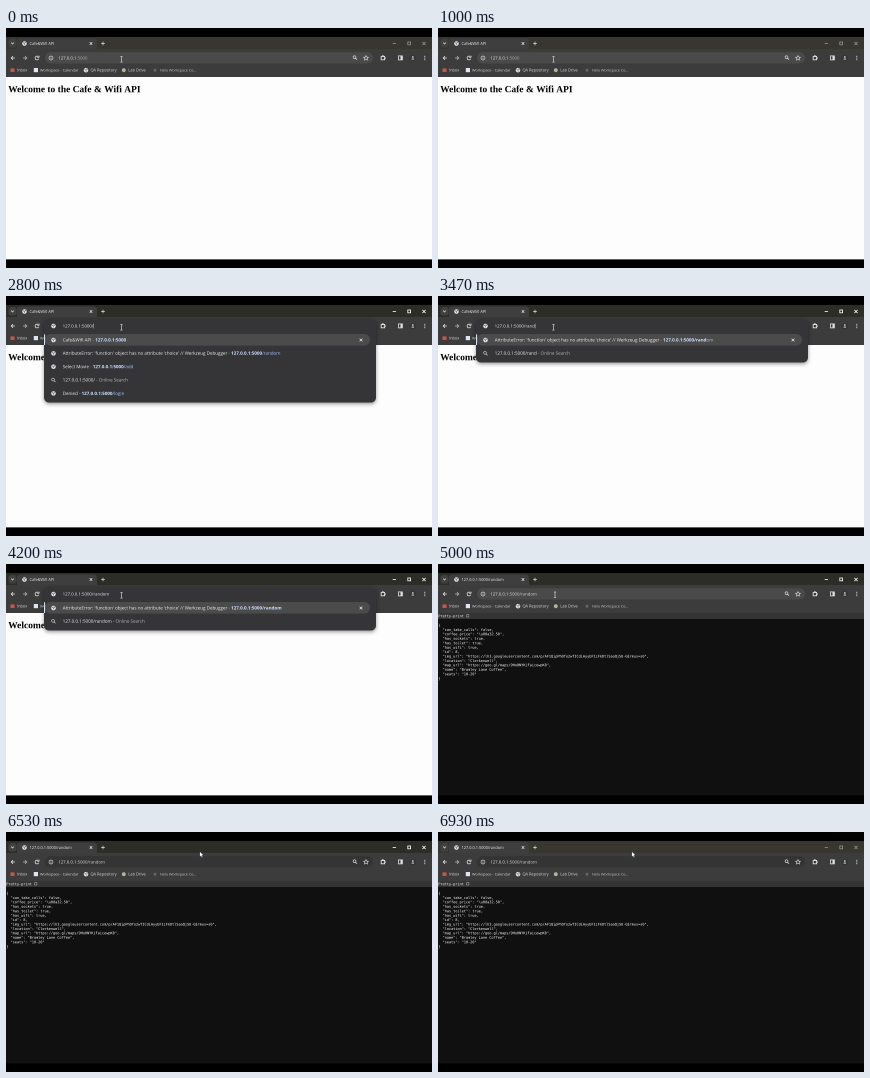
Animation, 426 px wide and 240 px high, one loop 6990 ms. Source, as an HTML page with a canvas:

```html
<!DOCTYPE html>
<html lang="en">
<head>
<meta charset="utf-8">
<title>Cafe API demo</title>
<style>
html, body { margin: 0; width: 100%; height: 100%; overflow: hidden; background: #000; }
canvas { display: block; width: 426px; height: 240px; }
</style>
</head>
<body>
<canvas id="stage"></canvas>
<script>
const W = 426, H = 240, LOOP = 6990;
const UI = '"Open Sans", "Noto Sans", sans-serif';
const MONO = '"DejaVu Sans Mono", "Liberation Mono", monospace';
const SERIF = '"Liberation Serif", "Noto Serif", serif';
const HOST = '127.0.0.1:5000';

// Moments in ms
const ACTIVE = 1250, CLICK = 1750, SLASH = 2300, TYPE = 3000, KEY = 150,
      ENTER = 4750, MOVE = 5800, ARRIVE = 6350, BLUR = 6700;

const canvas = document.getElementById('stage');
const screen2d = canvas.getContext('2d');
const dpr = window.devicePixelRatio || 1;
canvas.width = W * dpr;
canvas.height = H * dpr;

// The scene is drawn large and scaled down, so tiny text stays legible
const SCALE = 4;
const scene = document.createElement('canvas');
scene.width = W * SCALE;
scene.height = H * SCALE;
const c = scene.getContext('2d');
c.scale(SCALE, SCALE);

const JSON_LINES = [
  '{',
  '  "can_take_calls": false,',
  '  "coffee_price": "\\u00a32.50",',
  '  "has_sockets": true,',
  '  "has_toilet": true,',
  '  "has_wifi": true,',
  '  "id": 8,',
  '  "img_url": "https://lh3.googleusercontent.com/p/AF1QipPhOfo2wTICdiAyybF1iFkDtlSaoQjSU-GErmus=s0",',
  '  "location": "Clerkenwell",',
  '  "map_url": "https://goo.gl/maps/9Ho0NYKiFaicewpK8",',
  '  "name": "Bramley Lane Coffee",',
  '  "seats": "10-20"',
  '}'
];

function box(x, y, w, h, fill, r = 0) {
  c.fillStyle = fill;
  c.beginPath();
  c.roundRect(x, y, w, h, r);
  c.fill();
}

function text(s, x, y, size, fill, weight = 400, font = UI) {
  c.font = `${weight} ${size}px ${font}`;
  c.fillStyle = fill;
  c.fillText(s, x, y);
  return x + c.measureText(s).width;
}

// Each argument after the style is one polyline: [x, y, x, y, ...]
function lines(color, width, ...paths) {
  c.strokeStyle = color;
  c.lineWidth = width;
  c.beginPath();
  for (const p of paths) {
    c.moveTo(p[0], p[1]);
    for (let i = 2; i < p.length; i += 2) c.lineTo(p[i], p[i + 1]);
  }
  c.stroke();
}

function ring(x, y, r, color, width = 0.7, from = 0, to = Math.PI * 2) {
  c.strokeStyle = color;
  c.lineWidth = width;
  c.beginPath();
  c.arc(x, y, r, from, to);
  c.stroke();
}

function dot(x, y, r, color) {
  c.fillStyle = color;
  c.beginPath();
  c.arc(x, y, r, 0, Math.PI * 2);
  c.fill();
}

function cross(x, y, r, color, width = 0.7) {
  lines(color, width, [x - r, y - r, x + r, y + r], [x - r, y + r, x + r, y - r]);
}

function globe(x, y) {
  dot(x, y, 2.3, '#e2e4e8');
  lines('#55575a', 0.6, [x - 1.5, y - 0.8, x, y - 0.2, x + 0.3, y + 1.4], [x + 0.3, y - 1.6, x + 1.5, y - 0.3]);
}

function lens(x, y, color) {
  ring(x - 0.5, y - 0.5, 1.4, color);
  lines(color, 0.8, [x + 0.5, y + 0.5, x + 2, y + 2]);
}

function star(x, y, r, color) {
  const p = [];
  for (let i = 0; i <= 10; i++) {
    const a = -Math.PI / 2 + i * Math.PI / 5, d = i % 2 ? r * 0.48 : r;
    p.push(x + d * Math.cos(a), y + d * Math.sin(a));
  }
  lines(color, 0.6, p);
}

function tabStrip(title, active) {
  box(0, 9, W, 14, active ? '#2d2d27' : '#37372f');
  box(11, 10.5, 80, 14, '#3e3e3e', 3);
  box(2.5, 11, 8, 8.5, '#414141', 2.5);
  lines('#d8d8d8', 0.8, [5.2, 14.6, 6.5, 16, 7.8, 14.6]);
  globe(18.5, 15.5);
  text(title, 23.5, 17, 3.9, '#ececec');
  cross(85, 15.5, 1.3, '#e4e4e4');
  lines('#e0e0e0', 0.7, [95.2, 15.5, 98.8, 15.5], [97, 13.7, 97, 17.3]);

  const tone = active ? '#fff' : '#929292';
  lines(tone, 0.8, [386.7, 15.5, 390, 15.5]);
  c.strokeRect(401.8, 14, 2.8, 2.8);
  cross(418, 15.5, 1.6, tone, 0.8);
}

function toolbar(focused, hover) {
  box(0, 21, W, 28, '#3c3c3c');
  const tone = '#e0e0e0';
  lines(tone, 0.8, [9, 30, 5.2, 30], [7, 28.2, 5.2, 30, 7, 31.8]);
  lines('#b0b0b0', 0.8, [17, 30, 20.8, 30], [19, 28.2, 20.8, 30, 19, 31.8]);
  ring(31, 30, 1.9, tone, 0.8, 0.4, 5.4);
  lines(tone, 0.8, [33, 27.6, 33, 29.3, 31.3, 29.3]);
  if (!focused) {
    box(39, 24.2, 328, 11.3, hover ? '#4a4a4a' : '#343434', 5.6);
    ring(45, 30, 2, tone, 0.6);
    lines(tone, 0.6, [45, 29.7, 45, 31.1], [45, 28.7, 45, 29.2]);
    lens(349, 29.7, tone);
    star(360, 30, 2.5, tone);
  }
  c.strokeStyle = tone;
  c.lineWidth = 0.9;
  c.strokeRect(375.2, 28.4, 3.4, 3.4);
  dot(376.9, 28.1, 0.9, tone);
  dot(379, 30.1, 0.8, tone);
  c.lineWidth = 0.8;
  c.strokeRect(392.4, 27.9, 4, 4);
  box(394.5, 28, 1.9, 4, tone);
  dot(406.8, 30, 3, '#343434');
  dot(406.8, 29, 0.9, '#c4c4c4');
  box(405.5, 30.5, 2.6, 1.2, '#c4c4c4', 0.6);
  for (let i = -1; i < 2; i++) dot(418.8, 30 + i * 1.7, 0.55, tone);
}

function bookmarks() {
  const y = 43.6, tone = '#dedede', size = 3.95;
  box(4.5, 40.4, 4, 3.6, '#c9564b');
  text('Inbox', 11, y, size, tone);
  box(27.8, 40, 4.2, 4.2, '#dfe5ee');
  text('Workspace - Calendar', 34, y, 3.8, tone);
  globe(80, 42.2);
  text('QA Repository', 84.5, y, size, tone);
  dot(117.8, 42.2, 2, '#a9b79b');
  text('Lab Drive', 122.3, y, size, tone);
  dot(149, 42.2, 1.6, '#5d6470');
  text('Nelu Workspace Co...', 154, y, 3.7, '#c4c8ce');
}

function homePage() {
  box(0, 49, W, 182.4, '#fdfdfd');
  text('Welcome to the Cafe & Wifi API', 2.2, 64.3, 9.47, '#000', 700, SERIF);
}

function jsonPage() {
  const size = 3.54;
  box(0, 49, W, 182.4, '#101010');
  box(0, 49, W, 6, '#343434');
  text('Pretty-print', 0.3, 53.2, size, '#fff', 400, MONO);
  c.strokeStyle = '#b8b8b8';
  c.lineWidth = 0.5;
  c.strokeRect(28.6, 50.7, 2.3, 2.3);
  JSON_LINES.forEach((s, i) => text(s, 0.3, 62.5 + i * 4.43, size, '#fff', 400, MONO));
}

function suggestions(query) {
  const error = "AttributeError: 'function' object has no attribute 'choice' // Werkzeug Debugger";
  const search = { name: HOST + query, note: 'Online Search' };
  if (query !== '/') return [{ name: error, bold: HOST + query, rest: '/random'.slice(query.length) }, search];
  return [
    { name: 'Cafe&Wifi API', bold: HOST },
    { name: error, bold: HOST, rest: '/random' },
    { name: 'Select Movie', bold: HOST, rest: '/add' },
    search,
    { name: 'Denied', bold: HOST, rest: '/login' }
  ];
}

function omnibox(query, t) {
  const rows = query ? suggestions(query) : [];
  const height = rows.length ? 17 + rows.length * 13.35 : 13;
  c.save();
  c.shadowColor = 'rgba(0,0,0,.4)';
  c.shadowBlur = 4 * SCALE;
  c.shadowOffsetY = 1.5 * SCALE;
  box(38, 22.8, 332, height, '#353538', 5);
  c.restore();
  globe(47.5, 30);

  if (!query) {
    c.font = `400 4.3px ${UI}`;
    box(56.5, 27, c.measureText(HOST).width + 1, 6, '#3f6b9e');
  }
  const end = text(HOST + query, 56.7, 31.6, 4.3, '#f0f0f0');
  if (query && (t - SLASH) % 1000 < 600) box(end + 0.2, 27.6, 0.4, 4.8, '#e4e4e4');

  const size = 4.53;
  rows.forEach((row, i) => {
    const y = 44 + i * 13.35, base = y + 1.5;
    if (!i) {
      box(39, 38, 325, 11.6, '#4b4b4c', 5.5);
      box(38, 38.2, 1.1, 11, '#d4e2f7', 0.5);
      cross(355, 44, 1.4, '#e8e8e8');
    }
    if (row.note) lens(47.5, y, '#c4c4c4'); else globe(47.5, y);
    let x = text(row.name, 56.7, base, size, '#f0f0f0');
    x = text(' - ', x, base, size, '#c4c4c4');
    if (row.note) text(row.note, x, base, size, '#b8b8b8');
    else {
      x = text(row.bold, x, base, size, '#cfe1ff', 700);
      text(row.rest || '', x, base, size, '#a8c7fa');
    }
  });
}

function ibeam(x, y) {
  lines('#d0d0d0', 0.7, [x, y - 2.6, x, y + 2.6], [x - 1.1, y - 2.8, x + 1.1, y - 2.8], [x - 1.1, y + 2.8, x + 1.1, y + 2.8]);
}

function arrow(x, y) {
  c.beginPath();
  [[0, 0], [0, 5.2], [1.2, 4.1], [2.1, 6], [2.9, 5.6], [2, 3.8], [3.7, 3.7]]
    .forEach(([dx, dy]) => c.lineTo(x + dx, y + dy));
  c.closePath();
  c.fillStyle = '#fff';
  c.fill();
  c.strokeStyle = '#111';
  c.lineWidth = 0.2;
  c.stroke();
}

function ease(t, from, to) {
  const k = Math.min(1, Math.max(0, (t - from) / (to - from)));
  return k * k * (3 - 2 * k);
}

function draw(t) {
  const loaded = t >= ENTER;
  const focused = t >= CLICK && !loaded;
  const drift = ease(t, ENTER, ENTER + 500), go = ease(t, MOVE, ARRIVE);
  const mx = 115.5 + 3 * drift + 75.3 * go, my = 31.3 - drift - 9.7 * go;
  const overBar = my > 24.5;

  box(0, 0, W, H, '#000');
  tabStrip(loaded ? HOST + '/random' : 'Cafe&Wifi API', t >= ACTIVE && t < BLUR);
  toolbar(focused, overBar);
  bookmarks();
  if (loaded) jsonPage(); else homePage();

  if (focused) {
    const letters = Math.min(6, Math.max(0, Math.floor((t - TYPE) / KEY) + 1));
    omnibox(t < SLASH ? '' : '/random'.slice(0, 1 + letters), t);
  } else {
    const x = text('127.0.0.1', 52.3, 31.6, 4.3, '#f0f0f0');
    text(':5000' + (loaded ? '/random' : ''), x, 31.6, 4.3, loaded ? '#dcdcdc' : '#b5b5b5');
  }
  if (overBar) ibeam(mx, my); else arrow(mx, my - 1);

  screen2d.imageSmoothingQuality = 'high';
  screen2d.drawImage(scene, 0, 0, canvas.width, canvas.height);
}

function frame(now) {
  draw(now % LOOP);
  requestAnimationFrame(frame);
}
draw(0);
requestAnimationFrame(frame);
</script>
</body>
</html>
```
